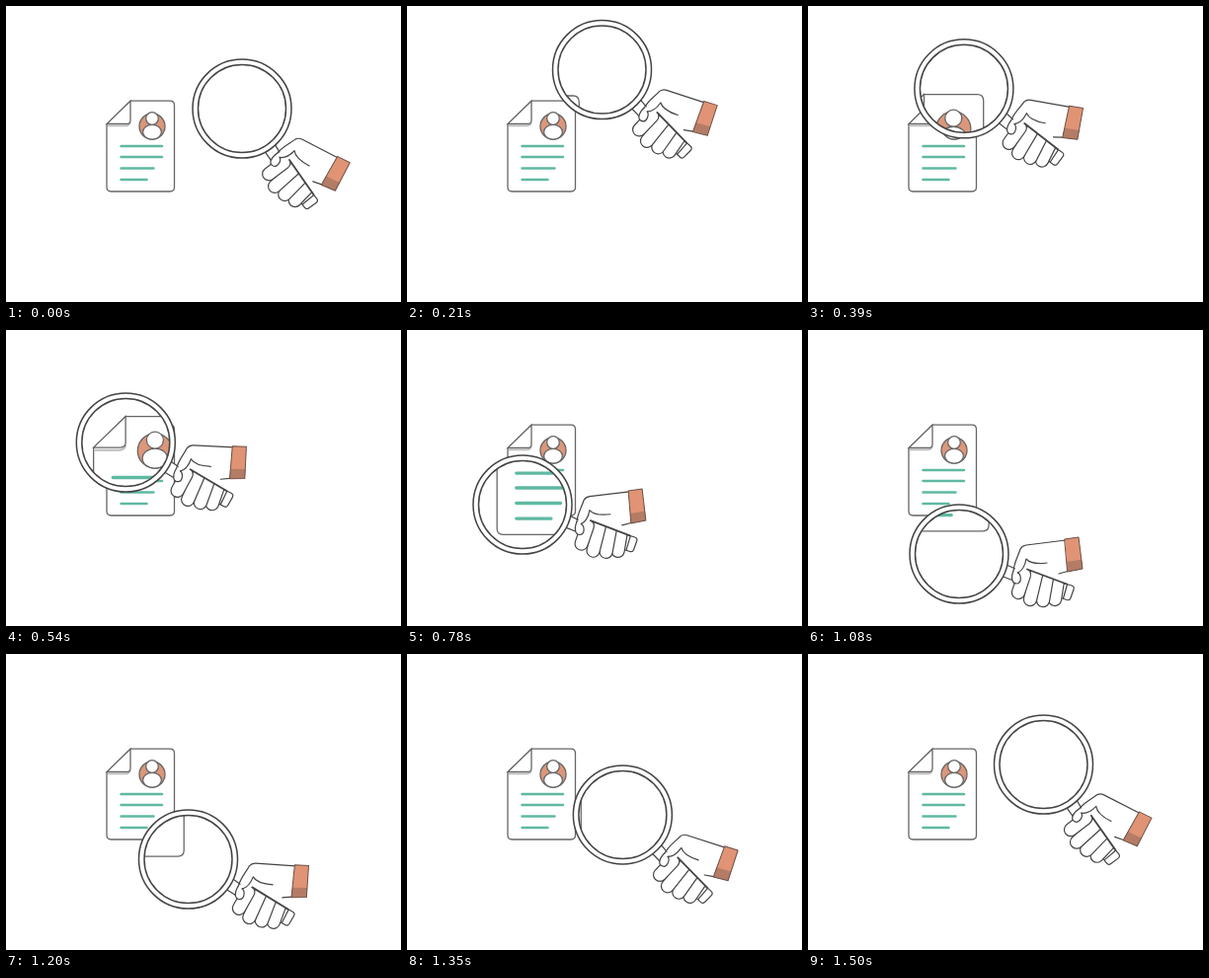
These frames come from a looping animation (400 by 300 pixels, 1.53 s). An HTML page:

```html
<!DOCTYPE html>
<html lang="en">
<head>
<meta charset="utf-8">
<title>Searching a document</title>
<style>
  html, body { margin: 0; width: 100%; height: 100%; overflow: hidden; background: #fff; }
  svg { display: block; width: 100vw; height: 100vh; }
  .line { fill: #fff; stroke: #666; stroke-width: 1.3; vector-effect: non-scaling-stroke; }
  .text { fill: none; stroke: #5fb9a2; stroke-width: 2.5; stroke-linecap: round; }
  .ink { fill: #fff; stroke: #444; stroke-width: 1.2; stroke-linejoin: round; stroke-linecap: round; }
  .open { fill: none; }
  .finger { stroke-linecap: round; stroke: #444; stroke-width: 14.4; }
  .finger.skin { stroke: #fff; stroke-width: 12; }
</style>
</head>
<body>
<svg viewBox="0 0 400 300">
  <defs>
    <clipPath id="lens"><circle id="hole" r="44.5"/></clipPath>
    <g id="doc">
      <path class="line" d="M126 96.2H166Q170.5 96.2 170.5 101V183.5Q170.5 188 166 188H106.500Q102 188 102 183.500V120Z"/>
      <path d="M103 121.500H121Q125 121.500 126 118" fill="none" stroke="#bbb" stroke-width="1.5"/>
      <path class="line" d="M126 96.2V116Q126 119.500 122 119.500H102Z"/>
      <circle class="line" cx="148" cy="122" r="13" style="fill:#dc977b"/>
      <ellipse class="line" cx="148" cy="127.700" rx="9.400" ry="7.400"/>
      <circle class="line" cx="148" cy="114" r="6.300"/>
      <path class="text" d="M116.500 142H158M116.500 153H158M116.500 164.500H149.500M116.500 176H142.500"/>
    </g>
  </defs>

  <use href="#doc"/>
  <g id="tool">
    <path class="ink" d="M199 237L212 243L208 254L195 249Z"/>
    <path class="ink" d="M252 254.500L267 259Q270 260 269 263L266 271.500Q265 274.500 262 273.500L250 269.500Z"/>
    <path class="ink" d="M262.500 258L258.500 272"/>
    <g id="fingers"></g>
    <path fill="#fff" d="M210 246C209 236 213 229 215 222Q217 218.500 221 218L261 213L264 244L260 256.500L222 242.500Z"/>
    <path class="ink open" d="M208 246C208 236 213 229 215 222Q217 218.500 221 218L261 213M263 244.500L254 247"/>
    <path class="ink open" d="M222 242.500L262 257.500" style="stroke-width:1.8"/>
    <path class="ink" d="M208 244C205 252 207 257 211 257C217 257 216 248 212.500 246"/>
    <path class="ink open" d="M212.500 246Q219 243 221 232Q226 238 242 236"/>
    <path fill="#e09475" d="M260 212L274 210L278 242L263 245Z"/>
    <path fill="#b47c66" d="M262 235L277 232.500L278 242L263 245Z"/>
    <path class="ink open" d="M260 212L274 210L278 242L263 245Z" style="stroke:#6b5048;stroke-width:1"/>
  </g>
  <circle id="rim" class="ink" r="50" style="stroke-width:1.500"/>
  <g clip-path="url(#lens)"><use id="zoom" href="#doc"/></g>
  <circle id="edge" class="ink open" r="44.500" style="stroke-width:1.500"/>
</svg>
<script>
  const LOOP = 1530, STEP = 30, ZOOM = 1.353;
  const $ = id => document.getElementById(id);

  // time, lens x, lens y, tilt of the hand
  const KEYS = [
    [0, 239, 104, 34.6], [210, 197.5, 64.5, 25.2], [540, 121.3, 114, 10],
    [655, 87, 147, 3], [780, 117, 177, 0.5], [1080, 153, 227, 0],
    [1200, 184.5, 208, 11], [1500, 238.5, 112, 34.3]
  ];
  const N = KEYS.length;

  // periodic key: indices outside the table wrap to the neighbouring loop
  const key = i => {
    const k = KEYS[(i + N) % N];
    return [k[0] + Math.floor(i / N) * LOOP, ...k.slice(1)];
  };
  const slope = (i, c) => {
    const a = key(i), b = key(i + 1);
    return (b[c] - a[c]) / (b[0] - a[0]);
  };
  // harmonic mean of both slopes, flat at turning points
  const tangent = (i, c) => {
    const p = slope(i - 1, c), q = slope(i, c);
    return p * q > 0 ? 2 * p * q / (p + q) : 0;
  };
  function sample(t, c) {
    let i = N - 1;
    while (KEYS[i][0] > t) i--;
    const a = key(i), b = key(i + 1), h = b[0] - a[0];
    const u = (t - a[0]) / h, v = 1 - u;
    return v * v * (1 + 2 * u) * a[c] + u * u * (3 - 2 * u) * b[c]
      + h * u * v * (v * tangent(i, c) - u * tangent(i + 1, c));
  }

  // knuckle x, y and fingertip x, y
  const FINGERS = [[253, 254, 250, 273], [242, 251, 238, 274], [231, 248, 225, 273], [219, 248, 213, 266]];
  $('fingers').innerHTML = FINGERS.map(([x, y, u, v]) =>
    ['finger', 'finger skin'].map(c => `<path class="${c}" d="M${x} ${y}L${u} ${v}"/>`).join('')
  ).join('');

  function draw(t) {
    const [x, y, tilt] = [1, 2, 3].map(c => sample(t, c));
    for (const id of ['hole', 'rim', 'edge']) {
      $(id).setAttribute('cx', x);
      $(id).setAttribute('cy', y);
    }
    $('tool').setAttribute('transform', `translate(${x} ${y}) rotate(${tilt}) translate(-153 -227)`);
    // the enlarged page drifts slightly against the lens
    const dx = -48 - 0.07 * (x - 115) + 0.035 * (y - 140);
    const dy = -45 - 0.07 * (y - 148);
    $('zoom').setAttribute('transform', `translate(${dx} ${dy}) scale(${ZOOM})`);
  }

  const start = performance.now();
  function tick() {
    const t = (performance.now() - start) % LOOP;
    draw(Math.floor(t / STEP) * STEP);
    requestAnimationFrame(tick);
  }
  tick();
</script>
</body>
</html>
```
